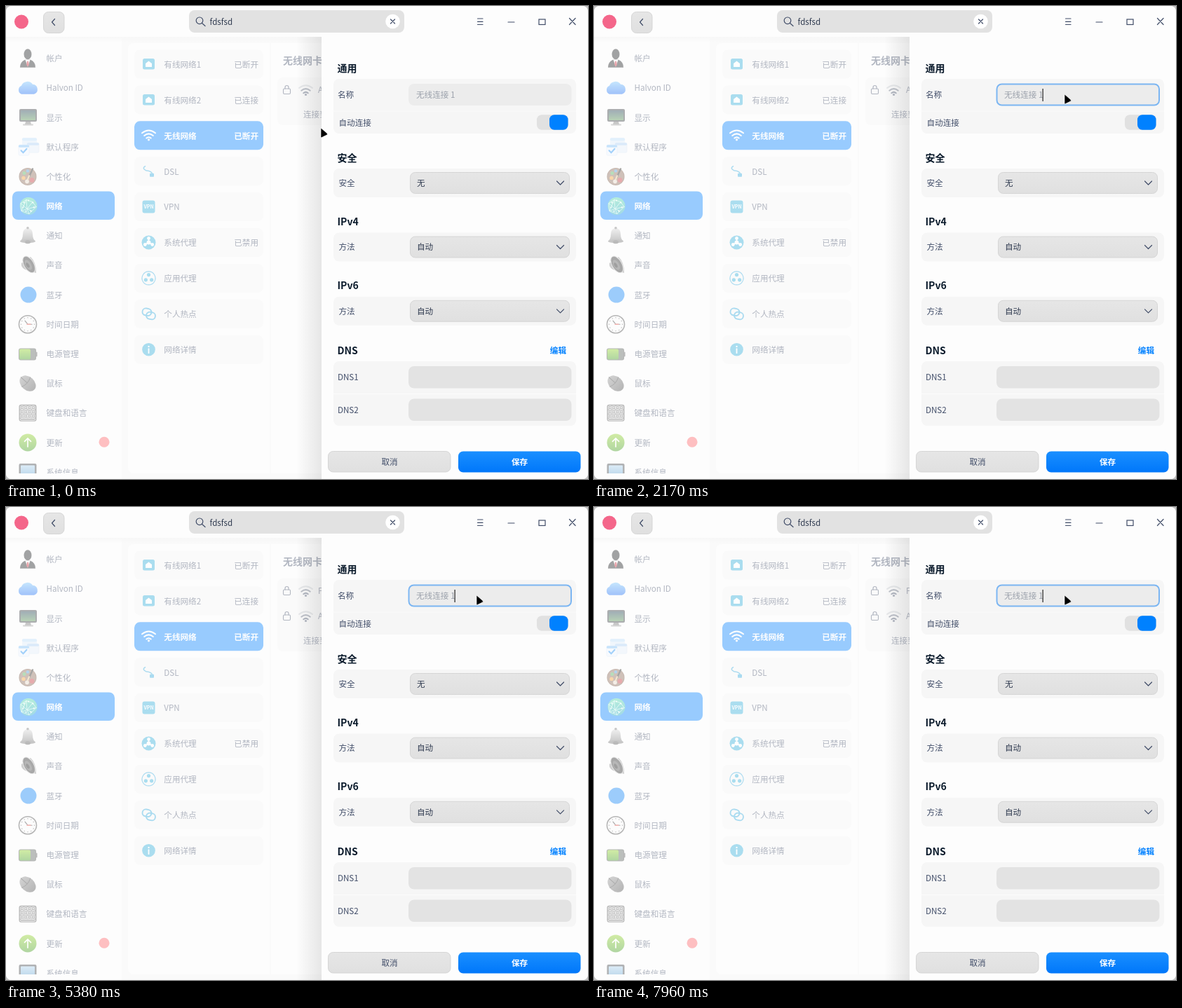
Recreate the animation shown at these times as an HTML page. Size 830 px wide and 675 px high, loop 8000 ms.

```html
<!DOCTYPE html>
<html lang="zh-CN">
<head>
<meta charset="utf-8">
<style>
  html, body { margin: 0; width: 100%; height: 100%; overflow: hidden; background: #c4c4c4; }
  svg { display: block; width: 830px; height: 675px; }
  text { font: 11.6px "Noto Sans CJK SC", "Noto Sans CJK JP", "Noto Sans", sans-serif; fill: #414d68; white-space: pre; }
  .b { font-weight: 700; }
  .h { font-size: 14px; font-weight: 700; }
  .line { fill: none; stroke: #414d68; stroke-width: 1.2; stroke-linecap: round; stroke-linejoin: round; }
  .cyan { fill: none; stroke: #2ca7dc; stroke-width: 1.5; stroke-linecap: round; }
</style>
</head>
<body>
<svg id="stage" viewBox="0 0 830 675"></svg>
<script>
const rect = (x, y, w, h, fill, r = 0, more = '') =>
  `<rect x="${x}" y="${y}" width="${w}" height="${h}" rx="${r}" fill="${fill}" ${more}/>`;
const circle = (x, y, r, fill, more = '') => `<circle cx="${x}" cy="${y}" r="${r}" fill="${fill}" ${more}/>`;
const path = (d, more = 'class="line"') => `<path d="${d}" ${more}/>`;
const shape = (d, fill, more = '') => path(d, `fill="${fill}" ${more}`);
const stroke = (d, color, width = 1, more = '') =>
  path(d, `fill="none" stroke="${color}" stroke-width="${width}" stroke-linecap="round" ${more}`);
// Text is placed by the middle of its line.
const text = (x, mid, s, cls = '', more = '') =>
  `<text x="${x}" y="${mid + (cls === 'h' ? 5.2 : 4.3)}" class="${cls}" ${more}>${s}</text>`;
const at = (x, y, body, id = '') => `<g id="${id}" transform="translate(${x} ${y})">${body}</g>`;
const gradient = (id, a, b) =>
  `<linearGradient id="${id}" x2="0" y2="1"><stop stop-color="${a}"/><stop offset="1" stop-color="${b}"/></linearGradient>`;
const ring = (n, r, draw) => Array.from({ length: n }, (_, i) => {
  const a = (i / n) * 2 * Math.PI - Math.PI / 2;
  return draw(r * Math.cos(a), r * Math.sin(a), i);
}).join('');
const toggle = (x, y) => rect(x, y, 45, 21.5, '#e1e1e1', 7) + rect(x + 18, y, 26.5, 21.5, '#0081ff', 7);

const screen = fill =>
  rect(-12, -12, 25, 18, '#30343a', 2) + rect(-10, -10, 21, 14, fill, 1) +
  shape('M-3 6H4L5 10H-4Z', '#777') + rect(-7, 9.5, 15, 2, '#999', 1);

const sideItems = [
  ['帐户', shape('M-11 13Q-11 5-4 2H4Q11 5 11 13Z', '#17181b') + shape('M-3.5 2H3.5L0 12Z', '#fff') +
    shape('M-1 4H1L1.8 9L0 12L-1.8 9Z', '#c8202f') + `<ellipse cy="-6" rx="5.5" ry="7.5" fill="#17181b"/>`],
  ['Halvon ID', shape('M-9 9A6.5 6.5 0 0 1-9-3A9 9 0 0 1 7-5A7.2 7.2 0 0 1 9 9Z', 'url(#cloud)')],
  ['显示', screen('url(#display)')],
  ['默认程序', rect(-8, -13, 21, 15, '#dcecfb', 2) + rect(-8, -13, 21, 4, '#b9dcfb', 2) +
    rect(-1, -6, 17, 14, '#e4eefa', 2, 'stroke="#cfe0f2" stroke-width=".6"') + rect(-1, -6, 17, 3.5, '#a9cff5', 1.5) +
    rect(-13, -3, 15, 15, '#eef6ff', 2, 'stroke="#cde1f6" stroke-width=".6"') + rect(-13, -3, 15, 3.5, '#76bdf8', 1.5) +
    stroke('M-9.5 5L-6.5 8L-1.5 2.5', '#168cf5', 2)],
  ['个性化', circle(0, 0, 12.5, '#73513e') + circle(0, 0, 11.5, '#8b6752') + circle(-6, 2, 2.7, '#f49b2d') +
    circle(-5, -5, 2.5, '#4fae55') + circle(0, -8, 2.2, '#4096d8') + circle(-1, 7, 2.8, '#e8d7c6') +
    circle(6, 5, 3.4, '#c52f35') + stroke('M7-11L1 2', '#26221f', 2.4) + stroke('M2-1L0 4', '#e4c18a', 2.4)],
  ['网络', circle(1, 0, 12.5, 'url(#globe)') +
    stroke('M-10-4L-2-9L7-6L12 1L6 7L-1 4L-9 7L-10-4L-1 4L7-6M-2-9L-1 4L2 11L6 7M-2-9L-9 7L2 11M-1 4L12 1', '#d6fff2', .8) +
    ring(7, 8, (x, y) => circle(x + 1, y, 1.1, '#f2fffb'))],
  ['通知', shape('M-11 8Q-7 5-7-2Q-7-10 0-11Q7-10 7-2Q7 5 11 8Z', 'url(#metal)') + circle(0, -11, 1.8, '#777') +
    `<ellipse cy="8" rx="11" ry="2.5" fill="#777"/><ellipse cy="9" rx="4" ry="2.5" fill="#555"/>`],
  ['声音', shape('M-9-3L4-12Q12-5 12 11L-4 6Q-10 3-9-3Z', '#8a8a8a') +
    `<g transform="rotate(-30)"><ellipse cx="2" rx="7" ry="13" fill="#272727" stroke="#ccc"/><ellipse cx="1" rx="4" ry="8" fill="#4d4d4d"/><ellipse rx="2" ry="4" fill="#111"/></g>`],
  ['蓝牙', circle(1, 0, 11.5, '#0b82f8')],
  ['时间日期', circle(0, 0, 12.5, '#fafafa', 'stroke="#4b4b4b" stroke-width="1.6"') +
    ring(12, 9.5, (x, y) => circle(x, y, .7, '#555')) + stroke('M0 0L-4-5M0 0H6', '#333', 1.2) + stroke('M-1 0H4', '#e8433c', 1.3)],
  ['电源管理', rect(-13, -8, 25, 17, '#4b4f4b', 3) + rect(-12, -7, 16, 15, 'url(#green)', 2) +
    rect(4, -7, 7, 15, '#59605a', 2) + rect(12, -3, 1.5, 7, '#555', 1)],
  ['鼠标', `<g transform="rotate(-48)"><ellipse rx="9.5" ry="13" fill="url(#mouse)"/>` +
    stroke('M-9-3Q0 1 9-3M0-13V-1', '#333', 1) + '</g>'],
  ['键盘和语言', rect(-12.5, -12, 25, 24, '#5d5d5d', 3) +
    [0, 1, 2].map(r => [0, 1, 2, 3].map(c =>
      rect(-10.5 + c * 5.4, -10 + r * 6, 4.6, 5, '#666', 1, 'stroke="#eee" stroke-width=".8"') +
      rect(-9 + c * 5.4, -8.3 + r * 6, 1.7, 1.6, '#eee')).join('')).join('') +
    rect(-10.5, 8, 21, 2.5, '#666', 1, 'stroke="#eee" stroke-width=".8"')],
  ['更新', circle(0, 0, 12.5, 'url(#green)') + stroke('M0 6V-6M-4.5-1.5L0-6L4.5-1.5', '#fff', 1.7)],
  ['系统信息', rect(-12.5, -12, 25, 19, '#3d4147', 2) + rect(-10, -9.5, 20, 14, 'url(#info)', 1)]
];
const sidebar = sideItems.map(([label, icon], i) => {
  const y = 74.7 + 42.17 * i, active = i === 5;
  return (active ? rect(9, 264.5, 146, 40.5, '#0081ff', 8) : '') + at(31, y, icon) +
    text(57.5, y + .3, label, active ? 'b' : '', active ? 'style="fill:#fff"' : '');
}).join('') + circle(140, 622.3, 7.5, '#ff6368');

const wifi = (a, b, c) => stroke('M-9.5-3.5Q0-11 9.5-3.5', a, 2) + stroke('M-6.3 .2Q0-5 6.3 .2', b, 2) +
  stroke('M-3.2 3.8Q0 1 3.2 3.8', c, 2) + circle(0, 6, 1.6, c);
const wired = rect(-8.5, -8, 17, 15.5, '#2caddb', 2.5) + shape('M-4.5 4V-1L0-4.5L4.5-1V4Z', '#fff');
const menuItems = [
  ['有线网络1', wired, '已断开'],
  ['有线网络2', wired, '已连接'],
  ['无线网络', wifi('#fff', '#fff', '#fff'), '已断开'],
  ['DSL', path('M-5-7Q-10-4-4-1Q5 0 5 4', 'class="cyan"') + rect(1.5, 3, 6, 5, '#2ca7dc', 1)],
  ['VPN', rect(-9, -9, 18, 18, '#2caddb', 3) +
    text(0, -1.7, 'VPN', 'b', 'text-anchor="middle" style="font-size:7px;fill:#fff"')],
  ['系统代理', circle(0, 0, 10, '#2caddb') + ring(3, 6, (x, y) => stroke(`M0 0L${x} ${y}`, '#fff', 1.6) + circle(x, y, 2.4, '#fff')) +
    circle(0, 0, 3, '#fff'), '已禁用'],
  ['应用代理', path('M0-9.5A9.5 9.5 0 1 1-.01-9.5', 'class="cyan" style="stroke-width:1.1"') +
    ring(3, 4.8, (x, y) => circle(x, y, 2.6, '#2caddb'))],
  ['个人热点', '<g class="cyan" style="stroke-width:1.9"><rect x="-9.5" y="-7" width="13" height="10" rx="5" transform="rotate(12)"/>' +
    '<rect x="-3" y="-3" width="13" height="10" rx="5" transform="rotate(12)"/></g>'],
  ['网络详情', circle(0, 0, 9.3, '#2caddb') + circle(0, -4.3, 1.2, '#fff') + stroke('M0-1V5', '#fff', 1.8)]
];
const menu = menuItems.map(([label, icon, state], i) => {
  const y = 83.5 + 50.9 * i, active = i === 2;
  const cls = active ? 'b' : '', color = active ? 'style="fill:#fff"' : '';
  return rect(183, y - 21, 184, 41, active ? '#0081ff' : '#f6f6f6', 8) + at(203.5, y - .5, icon) +
    text(225.3, y, label, cls, color) + (state ? text(360, y, state, cls, `text-anchor="end" ${color}`) : '');
}).join('');

const nextArrow = y => path(`M796 ${y - 5}L801.5 ${y}L796 ${y + 5}`, 'class="line" style="stroke-width:1.4"');
const network = name =>
  rect(395.5, 118, 10, 7.5, 'none', 1.5, 'stroke="#414d68" stroke-width="1.1"') + path('M398 118V116A2.5 2.5 0 0 1 403 116V118') +
  at(427.5, 120.5, wifi('#c5c8ce', '#626b7e', '#414d68')) + text(445, 120, name) + nextArrow(120);
const wireless = text(395, 78, '无线网卡', 'h') + toggle(759, 66.5) +
  '<rect id="listCard" x="387" y="102" width="425" height="68" rx="8" fill="#f6f6f6"/>' +
  `<g id="extra">${network('Pelvino')}</g>` +
  at(0, 0, path('M387 138H812V162Q812 170 804 170H395Q387 170 387 162Z', 'id="hover" fill="#e0e0e0"') +
    network('Arbolin') + text(424, 154.3, '连接到隐藏网络') + nextArrow(153.5), 'known');

const box = (y, h) => rect(467, y, 346, h, '#f6f6f6', 8);
const divider = y => rect(467, y, 346, 1, '#fcfcfc');
const heading = (y, s) => text(472.5, y, s, 'h', 'style="fill:#0a1a2b"');
const button = (x, y, w, h = 30) => rect(x, y, w, h, 'url(#button)', 7, 'stroke="#d0d0d0" stroke-width=".8"');
const choice = (y, title, label, value, top) =>
  heading(top, title) + box(y - 20.5, 41) + text(474.5, y, label) + button(576.5, y - 15, 227) +
  text(586, y, value, '', 'style="fill:#303b50"') + path(`M785.5 ${y - 2.5}L790.5 ${y + 2.5}L795.5 ${y - 2.5}`);
const panel = rect(414, 44, 36, 631, 'url(#shadow)') + rect(450, 44, 380, 631, '#fdfdfd') +
  heading(89, '通用') + box(104, 78) + divider(149.5) + text(473, 127, '名称') + text(474.5, 166.5, '自动连接') +
  rect(574, 111, 232.5, 31, '#ececec', 8) +
  text(585, 127, '无线连接 1', '', 'style="fill:#9ba1ab"') +
  `<g id="focus">${rect(574.5, 111.5, 231.5, 30, 'none', 7, 'stroke="#7cb6f2" stroke-width="2"')}${rect(639.5, 118, 1.2, 18, '#222')}</g>` +
  toggle(757, 155.3) +
  choice(252.5, '安全', '安全', '无', 216.5) + choice(344, 'IPv4', '方法', '自动', 308) +
  choice(435.3, 'IPv6', '方法', '自动', 399) +
  heading(491.5, 'DNS') + text(799, 491.3, '编辑', 'b', 'text-anchor="end" style="fill:#0081ff"') +
  box(507, 92) + divider(553) +
  [530, 576.5].map((y, i) => text(473, y, 'DNS' + (i + 1)) + rect(574, y - 16, 232.5, 31.5, '#e3e3e3', 8)).join('') +
  button(459.5, 635.5, 174.5, 29.5) + text(547, 650.5, '取消', '', 'text-anchor="middle" style="font-weight:500"') +
  rect(645, 635.5, 174.5, 30, 'url(#save)', 7) + text(732.5, 650.5, '保存', 'b', 'text-anchor="middle" style="fill:#fff"');

const titlebar = rect(0, 0, 830, 44, '#fdfdfd') + circle(22, 22.5, 10, '#f4668a') +
  button(53.5, 8.5, 29.5) + path('M69.5 18.5L65.5 23L69.5 27.5') +
  rect(261, 6, 307, 32, '#e2e2e2', 8) + circle(276, 20.8, 4.8, 'none', 'class="line"') + path('M279.5 24.5L284 28.5') +
  text(290.5, 22.5, 'fdsfsd', '', 'style="fill:#303b50"') + circle(551.5, 22, 10.3, '#fff') +
  path('M548.5 19L554.5 25M554.5 19L548.5 25') +
  path('M672.5 18H680M672.5 22.3H680M672.5 26.5H680M716 23H725M803.5 17.5L812 26.5M812 17.5L803.5 26.5') +
  rect(760, 19, 9, 7.5, 'none', 0, 'stroke="#414d68" stroke-width="1.2"');

const stage = document.getElementById('stage');
stage.innerHTML = `<defs>
  ${gradient('cloud', '#72c3ff', '#1367f5')}${gradient('display', '#16384c', '#4e8f4a')}${gradient('globe', '#4ad7a6', '#16a3c4')}
  ${gradient('metal', '#ddd', '#777')}${gradient('green', '#8fd31f', '#3c9a17')}${gradient('mouse', '#909090', '#4c4c4c')}
  ${gradient('info', '#a9d3ef', '#5d9fd0')}${gradient('button', '#e6e6e6', '#e0e0e0')}${gradient('save', '#1a8fff', '#0077fa')}
  ${gradient('topShade', '#efefef', '#efefef00')}
  <linearGradient id="shadow"><stop stop-color="#000" stop-opacity="0"/><stop offset="1" stop-color="#000" stop-opacity=".09"/></linearGradient>
  <clipPath id="window"><rect width="830" height="675" rx="8"/></clipPath>
  <clipPath id="sideClip"><rect y="44" width="165" height="623"/></clipPath>
</defs>
<g clip-path="url(#window)">
  ${rect(0, 0, 830, 675, '#f6f6f6')}${rect(0, 44, 165, 631, '#fdfdfd')}
  <g clip-path="url(#sideClip)">${sidebar}</g>
  ${rect(174, 53, 646, 614, '#fdfdfd', 8)}${rect(376.5, 53, 1, 614, '#f1f1f1')}
  ${menu}${wireless}
  ${rect(0, 44, 830, 8, 'url(#topShade)')}
  ${rect(0, 44, 830, 631, '#fdfdfd', 0, 'id="veil"')}
  <g id="panel">${panel}</g>
  ${titlebar}
</g>
${at(0, 0, shape('M0 0L9 7.7Q10 9.8 8 10.3L1.3 13.6Q0 14 0 12.5Z', '#000', 'stroke="#fff" stroke-width=".6"'), 'pointer')}`;

const el = id => document.getElementById(id);
const parts = Object.fromEntries(['listCard', 'extra', 'known', 'hover', 'veil', 'panel', 'focus', 'pointer'].map(id => [id, el(id)]));
const progress = (t, from, to) => Math.min(1, Math.max(0, (t - from) / (to - from)));
const easeOut = p => 1 - (1 - p) ** 3;
const smooth = p => p * p * (3 - 2 * p);
const show = (part, on) => part.setAttribute('visibility', on ? 'visible' : 'hidden');
const move = (part, x, y) => part.setAttribute('transform', `translate(${x} ${y})`);

function draw(now) {
  const t = now % 8000;
  const open = t < 800 ? 1 - easeOut(progress(t, 40, 340)) : easeOut(progress(t, 960, 1260));
  const toRow = smooth(progress(t, 200, 600)), toField = smooth(progress(t, 1250, 1650));
  const x = 449 + 40 * toRow + 182 * toField, y = 174 - 29 * toRow - 19 * toField;
  const second = t >= 4600;

  move(parts.panel, 416 * (1 - open), 0);
  parts.veil.setAttribute('opacity', .6 * open);
  move(parts.pointer, x, y);
  show(parts.hover, open < .5 && y > 138 && y < 170);
  show(parts.focus, t >= 1690);
  show(parts.extra, second);
  move(parts.known, 0, second ? 36 : 0);
  parts.listCard.setAttribute('height', second ? 104 : 68);
  requestAnimationFrame(frame);
}
const start = performance.now();
const frame = () => draw(performance.now() - start);
frame();
</script>
</body>
</html>
```
